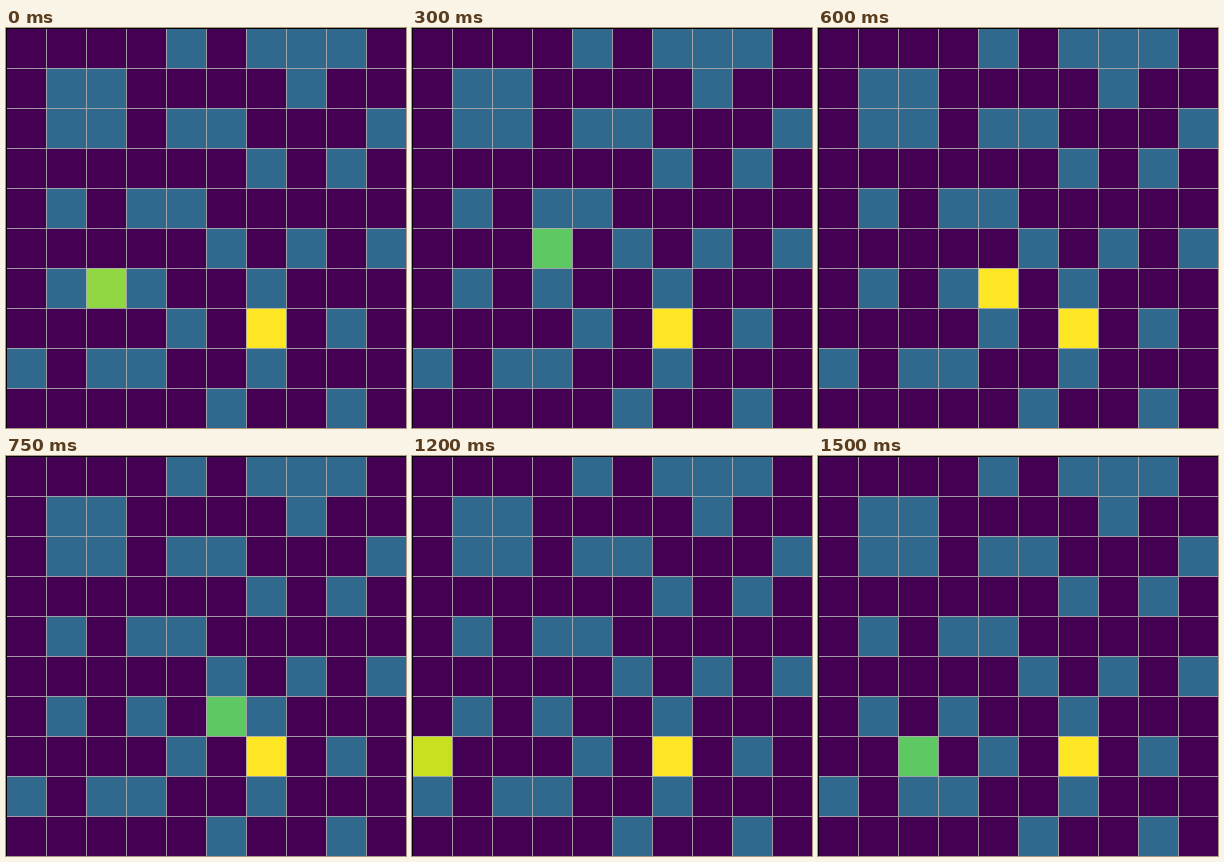
Recreate the animation shown at these times as an HTML page. Size 400 px wide and 400 px high, loop 1.65 s.

```html
<!DOCTYPE html>
<html lang="en">
<head>
<meta charset="utf-8">
<title>Grid walk</title>
<style>
  html, body { margin: 0; width: 100%; height: 100%; overflow: hidden; background: #440154; }
  svg { display: block; width: 400px; height: 400px; shape-rendering: crispEdges; }
  #walls { fill: #31688e; }
  #goal { fill: #fde725; }
  #lines { fill: #b0b0b0; fill-opacity: .87; }

  /* The walker's colour shows its heading. */
  :root { --right: #5ec962; --up: #90d743; --left: #c8e020; --down: #fde725; }
  #walker { animation: walk 1650ms step-end infinite; }
  @keyframes walk {
    0%       { transform: translate(80px, 240px);  fill: var(--up); }
    9.0909%  { transform: translate(80px, 200px);  fill: var(--up); }
    18.1818% { transform: translate(120px, 200px); fill: var(--right); }
    27.2727% { transform: translate(160px, 200px); fill: var(--right); }
    36.3636% { transform: translate(160px, 240px); fill: var(--down); }
    45.4545% { transform: translate(200px, 240px); fill: var(--right); }
    54.5454% { transform: translate(200px, 280px); fill: var(--down); }
    63.6363% { transform: translate(240px, 280px); fill: var(--right); }
    72.7272% { transform: translate(0, 280px);     fill: var(--left); }
    81.8181% { transform: translate(40px, 280px);  fill: var(--right); }
    90.909%  { transform: translate(80px, 280px);  fill: var(--right); }
    100%     { transform: translate(80px, 240px);  fill: var(--up); }
  }
</style>
</head>
<body>
<svg viewBox="0 0 400 400">
  <rect width="400" height="400" fill="#440154"/>
  <path id="walls"/>
  <rect id="goal" x="240" y="280" width="40" height="40"/>
  <rect id="walker" width="40" height="40"/>
  <path id="lines"/>
  <path d="M0 0H400V1H1V400H0Z" fill="#000"/>
</svg>
<script>
  const SIZE = 40;
  const rows = [
    '....#.###.',
    '.##....#..',
    '.##.##...#',
    '......#.#.',
    '.#.##.....',
    '.....#.#.#',
    '.#.#..#...',
    '....#...#.',
    '#.##..#...',
    '.....#..#.'
  ];
  const box = (x, y, w, h) => `M${x} ${y}h${w}v${h}h${-w}z`;

  let walls = '';
  rows.forEach((row, y) => [...row].forEach((cell, x) => {
    if (cell === '#') walls += box(x * SIZE, y * SIZE, SIZE, SIZE);
  }));
  document.getElementById('walls').setAttribute('d', walls);

  let lines = '';
  for (let p = SIZE; p < 400; p += SIZE) lines += box(p, 0, 1, 400) + box(0, p, 400, 1);
  document.getElementById('lines').setAttribute('d', lines);
</script>
</body>
</html>
```
